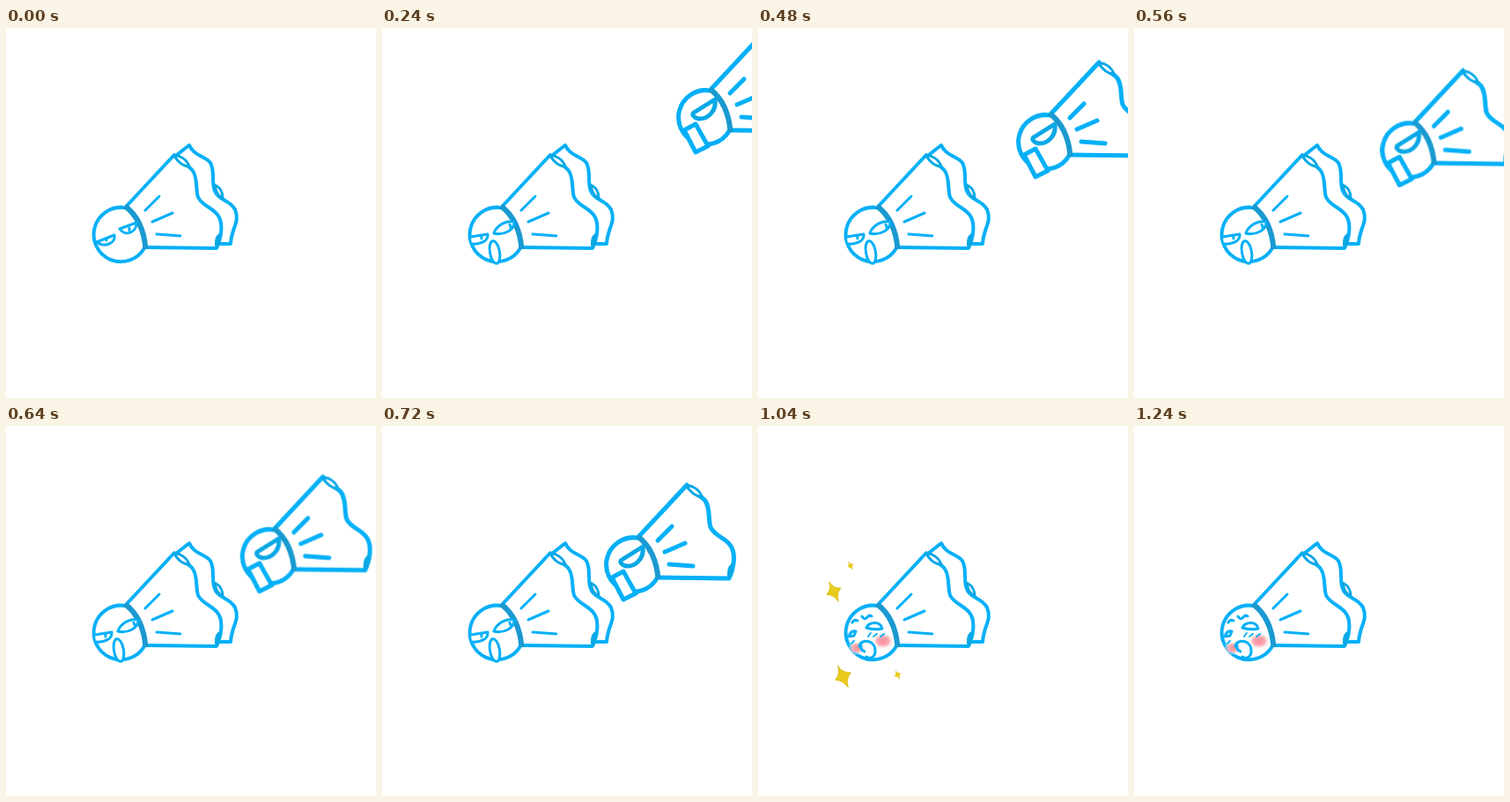
An HTML page that plays this animation: 420 by 420 pixels, repeating every 1280 ms.

```html
<!DOCTYPE html>
<html lang="en">
<head>
<meta charset="utf-8">
<title>Shuttlecocks</title>
<style>
html, body { margin: 0; width: 100%; height: 100%; overflow: hidden; background: #fff; }
svg { display: block; width: 100vw; height: 100vh; }

.bird { fill: #fff; stroke: #04b0f7; stroke-width: 4; stroke-linecap: round; stroke-linejoin: round; }
.thick { stroke-width: 5; }
.fine { stroke-width: 3; }
.line { fill: none; }
.band { fill: none; stroke: #1a9ad0; stroke-width: 6; stroke-linecap: butt; }
.fold { stroke: #0aa8e6; stroke-width: 3; }
.corner { fill: #0aa8e6; }

/* One 1280 ms loop: bored 0-120, angry 120-840, happy 840-1280 */
.bored, .angry, .happy, .sparkles { animation: 1280ms step-end infinite; }
.bored { animation-name: bored; }
.angry { animation-name: angry; }
.happy { animation-name: happy; }
.sparkles { animation-name: sparkles; }
.rival { animation: fly 1280ms infinite; }
.star { fill: #e8cb1c; stroke: #dcbc18; stroke-width: 1.2; stroke-linejoin: round; }
.big { animation: shrink 1280ms infinite; --end: .33; }
.small { animation: shrink 1280ms infinite; --end: .02; }

@keyframes bored { 0% { opacity: 1 } 9.375%, 100% { opacity: 0 } }
@keyframes angry { 0% { opacity: 0 } 9.375% { opacity: 1 } 65.625%, 100% { opacity: 0 } }
@keyframes happy { 0% { opacity: 0 } 65.625%, 100% { opacity: 1 } }
@keyframes sparkles { 0% { opacity: 0 } 65.625% { opacity: 1 } 96.875%, 100% { opacity: 0 } }
@keyframes fly {
  0% { opacity: 0; transform: translate(237px, -133px); animation-timing-function: step-end; }
  18.75% { opacity: 1; transform: translate(237px, -133px); animation-timing-function: steps(15); }
  65.624% { opacity: 1; transform: translate(134.5px, -63px); animation-timing-function: step-end; }
  65.625%, 100% { opacity: 0; transform: translate(134.5px, -63px); }
}
@keyframes shrink {
  0%, 65.625% { transform: scale(1); animation-timing-function: steps(10); }
  96.875%, 100% { transform: scale(var(--end)); }
}
</style>
</head>
<body>
<svg viewBox="0 0 420 420">
  <defs>
    <radialGradient id="blush">
      <stop offset="0" stop-color="#f98f9c"/>
      <stop offset=".5" stop-color="#fba9b2"/>
      <stop offset="1" stop-color="#fff" stop-opacity="0"/>
    </radialGradient>
    <path id="star" d="M-8-17Q-2-6 12-6Q4 3 8 17Q1 6-12 5Q-4-4-8-17Z"/>
    <g id="cone">
      <path d="M136 203L191 144C196 153 207 155 212 162C218 171 215 183 218 192C223 203 237 204 242 215C246 223 245 237 239 250L159 249"/>
      <path d="M135 204A30.8 30.8 0 1 0 157 250"/>
      <path class="fold" d="M191 145C197 144 205 149 208 157C201 157 195 152 191 145Z"/>
      <path class="fold corner" d="M242 235C238 238 238 245 239 249C242 246 243 240 242 235Z"/>
      <path class="band" d="M135 202Q156 218 158.500 251"/>
    </g>
    <path id="rays" d="M158 207L174 191M166 220L189 210M171 234L198 236"/>
  </defs>

  <g class="bird">
    <path d="M194 144L208 133C213 145 227 146 232 153C238 164 232 177 238 187C243 196 254 195 260 206C266 221 256 226 255 245L242 245"/>
    <path class="fold" d="M237 178C243 181 246 187 246 193C241 191 238 186 237 178Z"/>
    <use href="#cone"/>
    <use href="#rays" class="fine"/>

    <g class="bored fine">
      <path d="M103 243L123 235C125 244 112 250 103 243Z"/>
      <path d="M129 228L148 221C149 231 136 238 129 228Z"/>
      <path d="M114 239V241M140 227V230"/>
    </g>

    <g class="angry fine">
      <path d="M101 237L120 234C121 242 111 246 102 245"/>
      <path d="M127 233C130 224 141 218 150 220C151 229 138 236 127 233Z"/>
      <path d="M113 237V239M145 223L146 226"/>
      <ellipse cx="128" cy="254.500" rx="5.500" ry="13" transform="rotate(-10 128 254.500)"/>
    </g>

    <g class="happy fine">
      <g stroke="none" fill="url(#blush)">
        <ellipse cx="142" cy="244" rx="13" ry="10"/>
        <ellipse cx="112" cy="252" rx="10" ry="8"/>
      </g>
      <g class="line">
        <path d="M107 223Q109 219 113 221M118 216Q121 221 124 217Q126 214 129 216"/>
        <path d="M123 229C126 222 139 221 141 230Q132 232 123 229Z"/>
        <path d="M103 239Q105 232 111 233L109 238Z"/>
        <path stroke-width="2" d="M125 239L128 235M131 239L135 236M139 239L143 236M106 247L109 244"/>
        <path d="M115 250C117 241 134 242 133 257C132 263 127 265 123 262M117 247C116 252 118 255 121 256"/>
      </g>
    </g>
  </g>

  <g class="sparkles star">
    <g transform="translate(86 188)"><use class="big" href="#star"/></g>
    <g transform="translate(96.500 284.500) scale(1.100)"><use class="big" href="#star"/></g>
    <g transform="translate(105 158.500) scale(.54)"><use class="small" href="#star"/></g>
    <g transform="translate(158.500 282.500) scale(.56)"><use class="small" href="#star"/></g>
  </g>

  <g class="rival">
    <g class="bird thick">
      <use href="#cone"/>
      <use href="#rays"/>
      <path stroke="#0aa8e6" d="M117 229L141 214C143 228 132 237 122 236C117 235 114 231 117 229Z"/>
      <path d="M106 249L119 242L133 267L119 274Z"/>
    </g>
  </g>
</svg>
</body>
</html>
```
